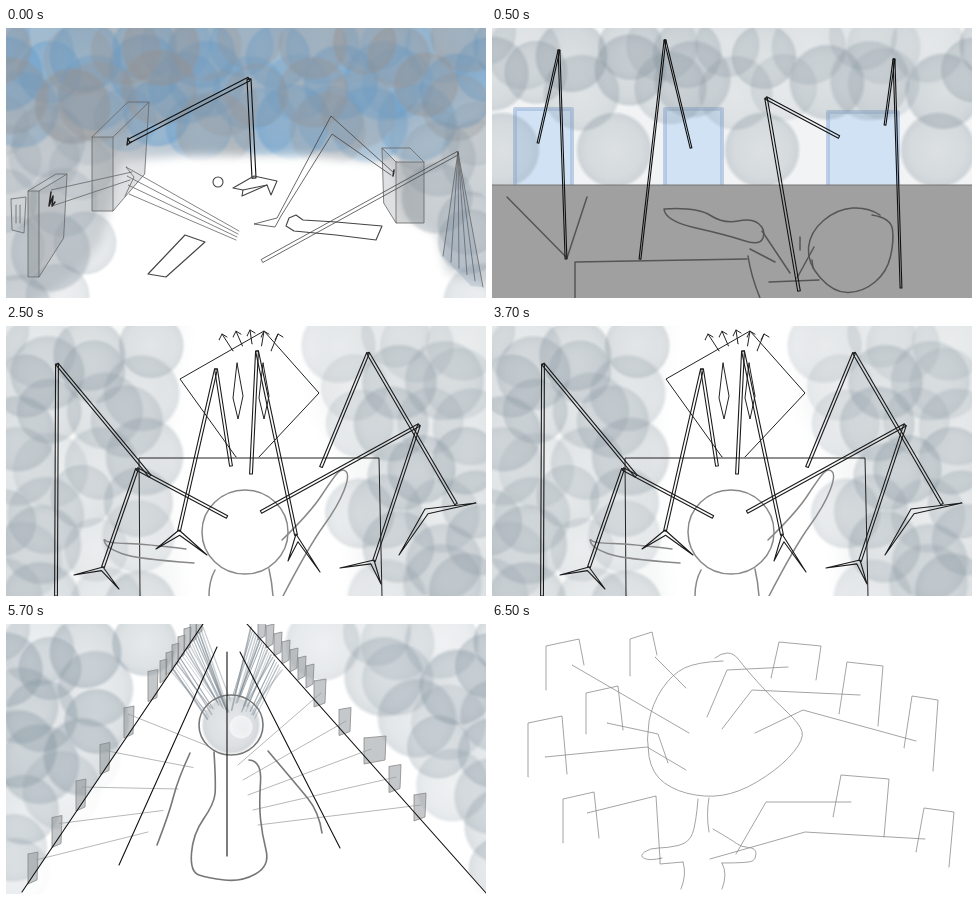
An HTML page with a canvas for the animation above (8000 ms loop, 480 by 270 pixels).

```html
<!DOCTYPE html>
<html lang="en">
<head>
<meta charset="utf-8">
<title>Storyboard sketches</title>
<style>
html, body { margin: 0; width: 100%; height: 100%; overflow: hidden; background: #fff; }
canvas { display: block; width: 480px; height: 270px; }
</style>
</head>
<body>
<canvas id="stage" width="480" height="270"></canvas>
<script>
const g = document.getElementById('stage').getContext('2d');
g.lineJoin = g.lineCap = 'round';

let ink, weight, seed;
const pen = (color, width) => { ink = color; weight = width; };
const rand = () => (seed = seed * 16807 % 2147483647) / 2147483647;
const repeat = (n, fn) => { for (let i = 0; i < n; i++) fn(i); };

// Points come as "x,y x,y ..."; "|" separates strokes.
const points = s => s.trim().split(/\s+/).map(p => p.split(',').map(Number));
const each = (s, fn) => s.split('|').forEach(part => fn(points(part)));

function trace(p) {
  g.beginPath();
  p.forEach(([x, y]) => g.lineTo(x, y));
}
function stroke() {
  g.strokeStyle = ink;
  g.lineWidth = weight;
  g.stroke();
}
const path = p => { trace(p); stroke(); };
const lines = s => each(s, path);
const line = (...xy) => path([xy.slice(0, 2), xy.slice(2)]);

function curves(s) {
  each(s, p => {
    g.beginPath();
    g.moveTo(...p[0]);
    for (let i = 1; i < p.length - 1; i++) {
      const [x, y] = p[i], [u, v] = p[i + 1], last = i === p.length - 2;
      g.quadraticCurveTo(x, y, last ? u : (x + u) / 2, last ? v : (y + v) / 2);
    }
    stroke();
  });
}
function area(p, color, blur = 0) {
  g.save();
  if (blur) g.filter = `blur(${blur}px)`;
  g.fillStyle = color;
  trace(p);
  g.fill();
  g.restore();
}
const fill = (s, color, blur) => area(points(s), color, blur);
function paper(color) {
  g.fillStyle = color;
  g.fillRect(0, 0, 480, 270);
}
function ring(x, y, rx, ry = rx) {
  g.beginPath();
  g.ellipse(x, y, rx, ry, 0, 0, 7);
  stroke();
}

// A limb is two parallel strokes along every segment.
function limbs(s, gap) {
  each(s, p => p.slice(1).forEach(([c, d], i) => {
    const [a, b] = p[i], k = gap / 2 / Math.hypot(c - a, d - b);
    const dx = (b - d) * k, dy = (c - a) * k;
    path([[a + dx, b + dy], [c + dx, d + dy], [c - dx, d - dy], [a - dx, b - dy], [a + dx, b + dy]]);
  }));
}

// Soft brush dab, slightly darker near the rim.
function dab(x, y, r, rgb, alpha) {
  const grad = g.createRadialGradient(x, y, 0, x, y, r);
  [[0, .6], [.7, .8], [.9, 1], [1, 0]].forEach(([at, k]) =>
    grad.addColorStop(at, `rgba(${rgb},${alpha * k})`));
  g.fillStyle = grad;
  g.fillRect(x - r, y - r, 2 * r, 2 * r);
}
// Jittered grid of dabs wherever inside(x, y) holds.
function scatter(inside, rgb, alpha, step = 42) {
  for (let y = 15; y < 290; y += step)
    for (let x = 5; x < 500; x += step) {
      const u = x + (rand() - .5) * step * .7, v = y + (rand() - .5) * step * .7;
      const r = 33 + rand() * 9, a = alpha * (.6 + rand() * .6);
      if (inside(u, v)) dab(u, v, r, rgb, a);
    }
}

// Box with a front face and a side or top receding by (dx, dy), (dx, dy2) at its foot.
function crate(x, y, w, h, dx, dy, dy2) {
  const s = dx > 0 ? x + w : x, o = dx > 0 ? x : x + w;
  const front = [[x, y], [x + w, y], [x + w, y + h], [x, y + h], [x, y]];
  const side = [[s, y], [s + dx, y + dy], [s + dx * .88, y + h + dy2], [s, y + h]];
  area(front, 'rgba(130,134,138,.35)');
  area(side, 'rgba(150,154,158,.3)');
  path(front);
  path(side);
  path([[o, y], [o + dx, y + dy], [s + dx, y + dy]]);
}

function machineRoom() {
  paper('#dcdfe1');
  fill('-20,-20 500,-20 480,60 400,110 330,130 150,130 70,100 -20,80', '#b4c3cf', 14);
  const sky = (x, y) => y < 112 - Math.abs(x - 240) * .1;
  scatter(sky, '95,155,205', .4, 40);
  scatter(sky, '150,143,140', .38, 50);
  const sides = (x, y) => y > 95 && (x < 95 - Math.max(0, y - 190) * .3 || x > 405 + (y - 130) * .3);
  fill('115,134 180,128 300,128 385,136 400,190 430,205 440,245 485,258 485,280 20,280 65,250 95,215', '#fff', 5);
  scatter(sides, '125,140,152', .24);

  pen('#666', .8);
  crate(86, 109, 21, 74, 36, -35, -37);
  crate(22, 163, 11, 86, 28, -17, -39);
  crate(390, 134, 28, 61, -14, -14, -20);
  lines('5,171 20,169 18,205 6,202 5,171|10,177 10,195|14,177 14,195');

  // Tripod
  fill('452,124 437,228 465,258 477,259', 'rgba(120,145,170,.25)');
  repeat(6, i => line(452, 124, 437 + 8 * i, 228 + 6.2 * i));

  // Fan of rods
  lines('45,162 126,144|46,178 124,152|120,139 128,149 119,168');
  repeat(4, i => line(120 + i, 139 + 9 * i, 233 - i, 203 + 3 * i));
  pen('#222', 1.5);
  lines('45,164 43,178 47,168 46,178 49,174|122,110 121,117 125,114|388,142 387,148');

  pen('#111', 1.1);
  limbs('123,113 243,51 248,150', 4);
  pen('#444', .8);
  lines('388,145 325,88 271,190 248,196 269,199 275,188 326,106 385,147');
  limbs('452,125 256,233', 3.4);
  pen('#444', 1.1);
  lines('227,160 248,148 271,153 265,167 261,157 236,168 237,162 227,160|237,162 261,157');
  ring(212, 154, 5);
  lines('142,246 179,207 199,214 160,249 142,246|370,212 330,207 288,203 280,198 283,190 290,187 297,192 330,194 376,198 370,212');
}

function bedroom() {
  paper('#f1f3f4');
  pen('rgba(165,190,222,.7)', 4);
  [[23, 81], [173, 81], [336, 84]].forEach(([x, y], i) => {
    const w = i < 2 ? 57 : 70;
    g.fillStyle = '#d0e2f4';
    g.fillRect(x, y, w, 80);
    lines(`${x},160 ${x},${y} ${x + w},${y} ${x + w},160`);
  });
  scatter((x, y) => y < 75, '125,140,150', .27, 40);
  [10, 122, 270, 446].forEach(x => dab(x, 122, 39, '125,140,150', .3));
  g.fillStyle = '#a0a0a0';
  g.fillRect(0, 157, 480, 113);
  pen('#777', 1);
  line(0, 157, 480, 157);

  pen('#555', 1.5);
  lines('15,169 75,230 95,169|83,270 83,234 255,231|270,203 298,245|277,254 327,252|308,209 308,222|322,219 305,250|320,232 321,240|258,221 283,234');
  curves('256,228 259,248 268,270|172,181 205,179 232,196 260,190 274,202 268,218 235,207 173,193 172,181');
  curves('388,187 376,179 345,181 318,204 315,235 342,265 371,264 395,244 402,213 399,190 380,187');
  pen('#111', 1.1);
  limbs('74,231 67,22 46,115|148,231 173,12 199,120|409,260 402,31 393,97', 1.8);
  limbs('307,263 274,70 347,109', 2.6);
}

// Two pointed toes spreading from an ankle.
function talon(s) {
  each(s, ([[x, y], a, b]) => path([[x, y], a,
    [x + (a[0] + b[0] - 2 * x) * .12, y + (a[1] + b[1] - 2 * y) * .12], b, [x, y]]));
}

function creature() {
  paper('#f6f7f7');
  fill('180,-20 310,-20 310,80 345,150 350,290 175,290 160,130', '#fff', 10);
  scatter((x, y) => x < 150 || x > 350 - (y < 130 ? 30 : 0), '130,145,155', .26);

  pen('#222', 1);
  lines('230,131 174,53 258,5 313,67 253,131|134,270 133,132 373,132 376,270');
  [231, 257].forEach(x => lines(`${x},37 ${x + 6},70 ${x + 1},93 ${x - 4},72 ${x},37`));
  repeat(5, i => {
    const x = 216 + 14 * i, arc = Math.sin(i * Math.PI / 4), y = 8 - 4 * arc;
    line(227 + 9.5 * i, 25 - 7 * arc, x, y);
    lines(`${x - 3},${y + 6} ${x},${y} ${x + 5},${y + 3}`);
  });
  pen('#888', 1.5);
  ring(239, 206, 43, 42);
  curves('180,223 140,218 102,217 97,212 101,222 130,233 188,237|277,270 303,220 332,180 344,149 336,142 327,152 304,187 276,214');
  curves('209,244 203,255 203,270|263,243 266,256 267,270');

  pen('#1a1a1a', 1.1);
  limbs('50,270 51,38 144,150|221,191 131,143 97,241|225,140 210,43 173,205|245,148 251,25 290,209|315,141 362,27 450,178|255,186 413,99 368,235', 2.8);
  talon('97,241 68,249 113,263|173,204 150,223 201,229|290,208 282,235 314,246|419,183 470,177 393,229|368,234 334,242 375,258');
}

function avenue() {
  paper('#fff');
  const beside = (x, y) => x < 150 - y * .55 || x > 300 + y * .75;
  scatter(beside, '125,142,153', .3, 40);
  fill('197,0 241,0 490,279 9,279', 'rgba(255,255,255,.88)');

  // Streaks converging on the head
  repeat(36, i => {
    const t = i / 35, side = t < .5 ? t * 2 : 2 - t * 2;
    const x = t < .5 ? 164 + side * 34 : 276 - side * 32;
    pen(`rgba(115,128,138,${.3 + rand() * .4})`, .7 + rand() * 1.2);
    line(x, 46 - side * 44, 200 + t * 50, 78 + rand() * 18 - 8 * Math.sin(t * Math.PI));
  });
  dab(225, 101, 30, '150,160,168', .4);
  dab(235, 103, 12, '255,255,255', .6);

  // Rows of posts
  pen('#8a8a8a', .8);
  const post = (x, y, w, h) => {
    const p = [[x, y + 2], [x + w, y], [x + w - 1, y + h - 4], [x, y + h], [x, y + 2]];
    area(p, 'rgba(140,145,149,.5)');
    path(p);
  };
  repeat(7, i => {
    post(154 + i * 6, 35 - i * 8, 7, 24);
    post(300 - i * 8, 40 - i * 8, 8, 24);
  });
  repeat(6, i => post(22 + 24 * i, 228 - 36.5 * i, 10, 32));
  repeat(5, i => post(408 - 25 * i, 169 - 28.5 * i, i === 2 ? 22 : 12, 28));

  pen('#999', .7);
  repeat(5, i => {
    line(30 + 23 * i, 236 - 36.5 * i, 142 + 15 * i, 208 - 21.5 * i);
    line(415 - 25 * i, 181 - 28 * i, 252 - 5 * i, 201 - 15 * i);
  });
  pen('#777', 1.6);
  ring(225, 101, 32, 30);
  curves('208,128 210,160 208,180 187,210 184,248 202,254 235,258 264,242 256,210 253,180 256,137 243,136');
  curves('184,129 172,155 163,190 151,221|262,127 290,160 313,188 316,209');
  pen('#111', 1.1);
  lines('197,0 16,268|241,0 480,269|211,23 113,241|234,28 334,224|221,28 221,232');
}

// Open-bottomed panel; panels right of centre lean the other way.
function panel(x, y, w, h, h2) {
  path(x < 240
    ? [[x, y + h], [x, y + 7], [x + w, y], [x + w + 5, y + h2]]
    : [[x - 8, y + h], [x, y], [x + w, y + 4], [x + w - 5, y + h2]]);
}

function outline() {
  paper('#fff');
  pen('#8d8d8d', .8);
  curves('231,37 205,38 180,50 160,80 154,115 160,150 185,168 222,174 255,165 292,140 312,115 308,100 280,74 253,44 242,29 229,29 223,34');
  [[54, 15, 33, 51, 26], [138, 8, 22, 44, 23], [94, 62, 32, 48, 44], [36, 92, 34, 61, 58], [71, 168, 31, 51, 46],
   [287, 18, 42, 36, 38], [355, 38, 36, 52, 64], [420, 72, 26, 52, 75], [349, 151, 48, 42, 62], [432, 184, 30, 44, 59]]
    .forEach(p => panel(...p));
  lines('80,41 197,109|163,33 194,64|115,99 166,110 176,139|53,133 155,123 194,146|95,189 164,172 168,235');
  lines('296,43 235,46 215,93|368,71 260,66 230,105|424,117 311,86 263,109|359,178 274,178 244,230|433,215 313,208 218,235');
  curves('206,175 204,200 197,219 175,224 158,224 147,232 158,237 170,234');
  lines('168,234 168,240 191,238');
  curves('191,238 195,250 189,265|217,174 214,190 217,208|221,205 240,216 249,223 264,224 264,235 257,239 230,239|230,239 236,250 230,265');
}

const scenes = [[0, machineRoom], [500, bedroom], [2500, creature], [4500, avenue], [6500, outline]];
const start = performance.now();
let shown;

function tick() {
  const t = (performance.now() - start) % 8000;
  const draw = scenes.filter(([at]) => at <= t).pop()[1];
  if (draw !== shown) {
    seed = 77;
    draw();
    shown = draw;
  }
  requestAnimationFrame(tick);
}
tick();
</script>
</body>
</html>
```
